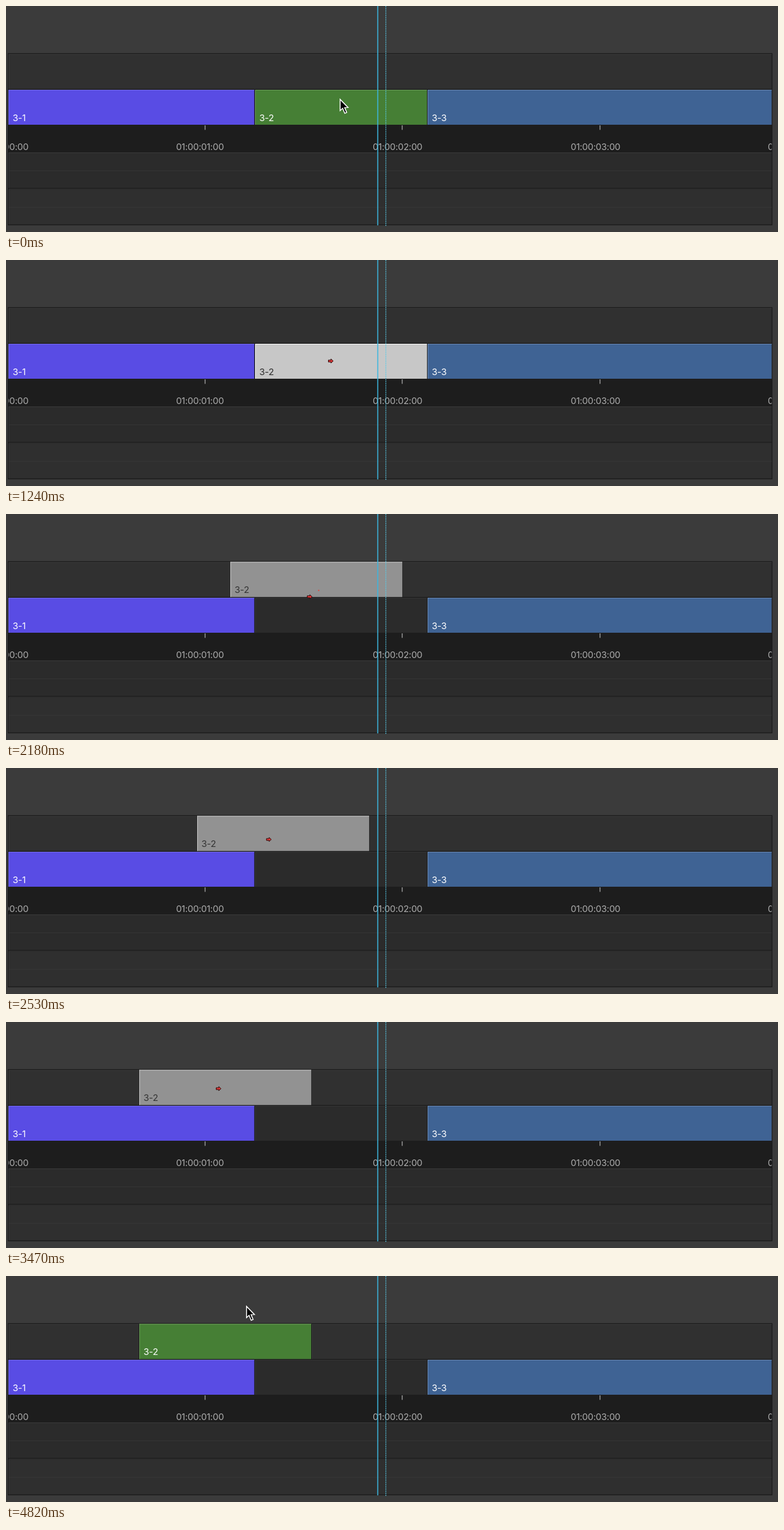
An HTML page with a canvas for the animation above (7.24 s loop, 1280 by 375 pixels).

```html
<!DOCTYPE html>
<html lang="en">
<head>
<meta charset="utf-8">
<title>Timeline clip drag</title>
<style>
  html, body { margin: 0; width: 100%; height: 100%; overflow: hidden; background: #3b3b3b; }
  canvas { display: block; width: 1280px; height: 375px; }
</style>
</head>
<body>
<canvas id="stage" width="1280" height="375"></canvas>
<script>
const ctx = document.getElementById('stage').getContext('2d');
const LOOP = 7240, FPS = 17;
const SELECT = 470, DRAG = 1715, DROP = 3700, DESELECT = 4110;
const HOME_X = 413, CLIP_W = 285, GRID = 13.7, GRAB_X = 553.5;
const UPPER_Y = 79.5, LOWER_Y = 139;
const FONT = '15px Inter, Roboto, sans-serif';

// pointer path: time, x, y
const PATH = [
  [1706, 553.5, 157], [1824, 552, 154], [2000, 541, 141], [2235, 511, 122],
  [2529, 451, 108], [2765, 404, 103], [3000, 374, 101], [3470, 367.5, 100],
  [3647, 367.5, 100], [3941, 398.3, 52.5]
];

// click ripples: start, duration
const RIPPLES = [[470.5, 764], [1529.4, 705], [4117.6, 705]];

const LOOKS = {
  green: { fill: '#467f35', edge: '#6c9f5b', text: '#fff', ripple: '#d9401f' },
  selected: { fill: '#c7c7c7', edge: '#fafafa', text: '#2e2e2e', ripple: '#ef635f' },
  ghost: { fill: '#929292', edge: '#c9c9c9', text: '#333', ripple: '#ea4a40' },
  purple: { fill: '#594ce4', edge: '#766cec', text: '#fff' },
  blue: { fill: '#3f6394', edge: '#6c8ab3', text: '#fff' }
};

function rect(color, x, y, w, h) {
  ctx.fillStyle = color;
  ctx.fillRect(x, y, w, h);
}

function label(text, x, y, color, align = 'left') {
  ctx.font = FONT;
  ctx.letterSpacing = '-0.25px';
  ctx.textAlign = align;
  ctx.fillStyle = color;
  ctx.fillText(text, x, y);
}

function disc(x, y, r, color) {
  ctx.fillStyle = color;
  ctx.beginPath();
  ctx.arc(x, y, r, 0, Math.PI * 2);
  ctx.fill();
}

function shape(points, x, y, fill, stroke, width) {
  ctx.beginPath();
  for (const [dx, dy] of points) ctx.lineTo(x + dx, y + dy);
  ctx.closePath();
  ctx.lineJoin = 'miter';
  ctx.lineWidth = width;
  ctx.strokeStyle = stroke;
  ctx.fillStyle = fill;
  ctx.fill();
  ctx.stroke();
}

function clip(name, x, y, w, look) {
  const h = y === UPPER_Y ? 58.2 : 58;
  rect(look.fill, x, y, w, h);
  rect(look.edge, x, y, w, 1);
  rect(look.edge, x, y, 1, h);
  label(name, x + 7, y + 51.6, look.text);
}

function pointerAt(t) {
  if (t <= PATH[0][0]) return PATH[0].slice(1);
  for (let i = 1; i < PATH.length; i++) {
    const [t0, x0, y0] = PATH[i - 1], [t1, x1, y1] = PATH[i];
    if (t <= t1) {
      const k = (t - t0) / (t1 - t0);
      return [x0 + (x1 - x0) * k, y0 + (y1 - y0) * k];
    }
  }
  return PATH[PATH.length - 1].slice(1);
}

function rippleAt(t) {
  for (const [start, span] of RIPPLES) {
    const u = (t - start + 1) / span;
    if (u >= 0 && u < 1) return 33.3 * Math.pow(1 - u, 1.45);
  }
  return 0;
}

function drawPanel() {
  rect('#3b3b3b', 0, 0, 1280, 375);
  rect('#191919', 3, 78.3, 1267.7, 285.5);
  rect('#303030', 4, 79.7, 1265.5, 58.1);
  rect('#3b3b3b', 4, 79.7, 1265.5, 1);
  rect('#3b3b3b', 4, 80, 1, 57);
  rect('#2b2b2b', 4, 139, 1265.5, 58);
  rect('#1d1d1d', 4, 197, 1265.5, 46);
  rect('#3a3a3a', 4, 243, 1265.5, 1);
  rect('#2b2b2b', 4, 244, 1265.5, 58);
  rect('#353535', 4, 273, 1265.5, 1);
  rect('#3b3b3b', 4, 303.3, 1265.5, 1);
  rect('#2f2f2f', 4, 304.3, 1265.5, 58.2);
  rect('#393939', 4, 333.5, 1265.5, 1);
  rect('#383838', 4, 244, 1, 58);
  rect('#383838', 4, 305, 1, 57);
}

function drawRuler() {
  ctx.save();
  ctx.beginPath();
  ctx.rect(4, 197, 1265.5, 46);
  ctx.clip();
  [-4, 321.5, 649.2, 977.4, 1304.5].forEach((x, i) =>
    label('01:00:0' + i + ':00', x, 238.9, '#acacac', 'center'));
  for (const x of [329.5, 656.3, 984.3]) rect('#b4b4b4', x, 198, 1.2, 7.5);
  ctx.restore();
}

function drawPlayheads() {
  rect('#3cb6de', 615.6, 0, 1.6, 364);
  for (let y = 0; y < 364; y += 3) rect('#58cdea', 629.1, y, 1.3, 1.7);
}

function drawPointer(t, x, y, r) {
  if (t >= SELECT && t < DROP) {
    const arrow = [[-4, -1.6], [0.3, -1.6], [0.3, -3.4], [4, 0],
      [0.3, 3.4], [0.3, 1.6], [-4, 1.6]];
    shape(arrow, x - 15, y + 10.6, r > 19 ? '#ef635f' : '#e03838', '#260808', 1);
  } else {
    const cursor = [[0.5, 0.9], [0.5, 19.6], [4.7, 15.8], [8.2, 24],
      [11.4, 22.6], [8, 14.6], [13.6, 14.4]];
    shape(cursor, x, y - 3, '#000', '#fff', 1.5);
  }
}

function draw(time) {
  const t = Math.floor((time + 6) * FPS / 1000) * 1000 / FPS;
  const [px, py] = pointerAt(t);
  const r = rippleAt(t);
  const dropped = t >= DROP;
  const steps = dropped ? 14 : Math.round((GRAB_X - px) / GRID);
  const x = Math.round(HOME_X - GRID * steps);
  const y = py < 138 ? UPPER_Y : LOWER_Y;
  const look = t < SELECT || t >= DESELECT ? LOOKS.green
    : t >= DRAG && !dropped ? LOOKS.ghost : LOOKS.selected;

  drawPanel();
  rect('#1a1a1a', 411.6, 139, 1.4, 58);
  rect('#383838', 413, 139, 1, 58);
  rect('#353535', 413, 139, 285, 1);
  rect('#1a1a1a', 698, 139, 1, 58);
  clip('3-1', 4, LOWER_Y, 407.6, LOOKS.purple);
  clip('3-3', 699, LOWER_Y, 570.5, LOOKS.blue);
  if (dropped) {
    rect('#1a1a1a', 220, 80, 1, 57.8);
    rect('#1a1a1a', 506, 80, 1.2, 57.8);
    rect('#3b3b3b', 507.2, 80, 1, 57.8);
  }
  clip('3-2', x, y, CLIP_W, look);
  drawRuler();
  drawPlayheads();

  if (r > 0) {
    disc(px, py, r, '#e02616');
    ctx.save();
    ctx.beginPath();
    ctx.rect(x, y, CLIP_W, 58);
    ctx.clip();
    disc(px, py, r, look.ripple);
    ctx.restore();
  }
  drawPointer(t, px, py, r);
}

const begin = performance.now();
function tick() {
  draw((performance.now() - begin) % LOOP);
  requestAnimationFrame(tick);
}
tick();
</script>
</body>
</html>
```
